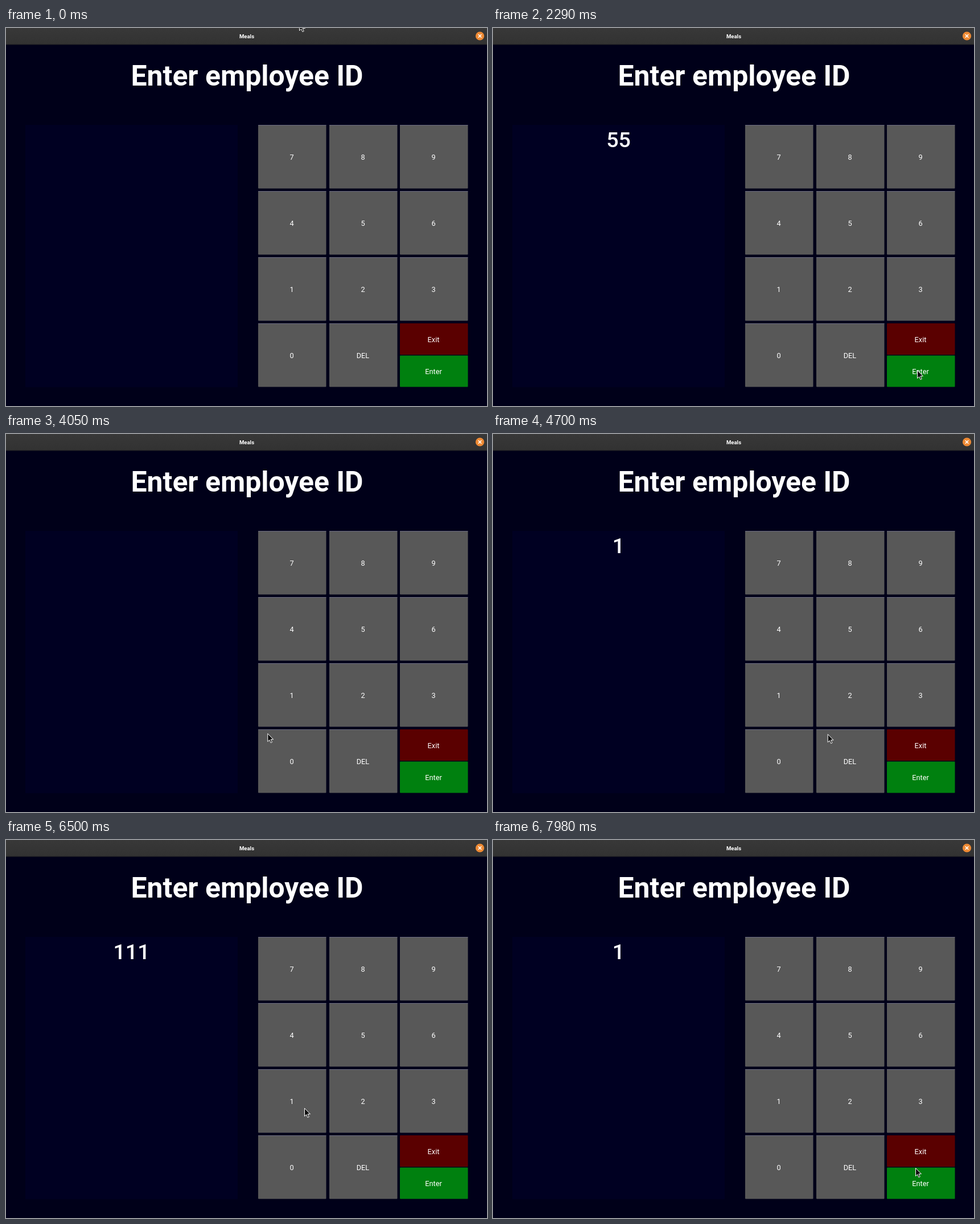
Write an HTML page that moves like this. It is 845 by 663 pixels and loops after 8000 ms.

```html
<!DOCTYPE html>
<html lang="en">
<head>
<meta charset="utf-8">
<title>Meals</title>
<style>
  html, body { margin: 0; width: 100%; height: 100%; overflow: hidden; background: #000019; }
  svg { display: block; width: 845px; height: 663px; }
  text { font-family: Roboto, sans-serif; fill: #fff; }
  .mid { text-anchor: middle; }
  .label { font-size: 12.75px; text-anchor: middle; }
</style>
</head>
<body>
<svg viewBox="0 0 845 663">
  <defs>
    <linearGradient id="bar" x2="0" y2="1">
      <stop offset="0" stop-color="#383838"/>
      <stop offset="1" stop-color="#323232"/>
    </linearGradient>
  </defs>
  <rect width="845" height="663" fill="#000019"/>
  <rect x="34" y="170" width="373" height="460" fill="#000022"/>
  <text class="mid" x="423.5" y="100.5" font-size="49.9" font-weight="700">Enter employee ID</text>
  <text id="entry" class="mid" x="220.5" y="209" font-size="37.6" font-weight="500"></text>
  <rect id="caret" x="219" y="174" width="1.2" height="44" fill="#d81028"/>
  <g id="keys"></g>

  <g id="popup">
    <rect y="29" width="845" height="634" fill="#000" fill-opacity=".7"/>
    <rect x="176" y="182" width="495" height="330" fill="#000010" fill-opacity=".78"/>
    <text x="191.5" y="209.5" font-size="11.9">Unknown Employee ID</text>
    <rect x="185" y="220" width="477" height="2" fill="#2fa7d4"/>
    <text class="mid" x="424" y="367.5" font-size="12.4">This ID is unknown, retry !</text>
  </g>

  <rect width="845" height="29" fill="url(#bar)"/>
  <rect y="28.5" width="845" height="1" fill="#1e1e22"/>
  <text class="mid" x="423" y="17.5" font-size="9.6" font-weight="700">Meals</text>
  <circle cx="832.5" cy="14" r="7.6" fill="#ee8a34"/>
  <path d="M829.7 11.2l5.6 5.6m0-5.6l-5.6 5.6" stroke="#fff" stroke-width="1.6"/>

  <path id="mouse" d="M.5 .5V14.5L3.7 11.6L5.9 16.6L8.2 15.6L6 10.7H10.4Z"
        fill="#0c0c0c" stroke="#fff" stroke-width="1" stroke-linejoin="round"/>
</svg>
<script>
const LOOP = 8000, HOLD = 85;
const GREY = "#585858", DOWN = "#32a4ce";
const $ = id => document.getElementById(id);

function add(tag, attrs, text = "") {
  const el = document.createElementNS("http://www.w3.org/2000/svg", tag);
  for (const k in attrs) el.setAttribute(k, attrs[k]);
  el.textContent = text;
  return $("keys").appendChild(el);
}

function makeKey(label, col, y, height, fill) {
  const x = Math.round(442.9 + col * 124.7), width = 119.5;
  const face = add("rect", { x, y, width, height, rx: 1, fill });
  if (fill === GREY) add("rect", { x, y, width, height: 1, fill: "#6c6c80" });
  add("text", { class: "label", x: x + 59, y: y + height / 2 + 5 }, label);
  return face;
}

const keys = {};
["789", "456", "123", ["0", "DEL"]].forEach((row, r) =>
  [...row].forEach((label, c) => {
    keys[label] = makeKey(label, c, 170 + r * 116, 111.5, GREY);
  }));
makeKey("Exit", 2, 518, 55, "#5a0000");
makeKey("Enter", 2, 574.5, 55, "#00800f");

// Pointer moves: start, end, and the point it comes to rest at
const moves = [
  [30, 260, 526, 156],
  [400, 720, 598, 289],
  [910, 1320, 621, 354],
  [1850, 2240, 745, 600],
  [2340, 2740, 728, 584],
  [3078, 3270, 379, 359],
  [3680, 3900, 428, 548],
  [3960, 4300, 504, 492],
  [4510, 5300, 727, 583],
  [5530, 5990, 643, 479.5],
  [5990, 6240, 524, 470],
  [6690, 7030, 189, 194],
  [7110, 7380, 524.5, 471],
  [7620, 7980, 742, 575]
];

// "Clear" wipes the field from the keyboard
const clicks = [
  [1510, "5"], [1710, "5"], [2255, "Enter"], [4430, "1"],
  [6280, "1"], [6410, "1"], [7000, "Clear"], [7520, "1"]
];

const ramp = (t, a, b) => Math.min(1, Math.max(0, (t - a) / (b - a)));
const easeOut = u => 1 - Math.pow(1 - u, 1.7);

function pointer(t) {
  let x = 515, y = -10;
  for (const [start, end, tx, ty] of moves) {
    const k = easeOut(ramp(t, start, end));
    x += (tx - x) * k;
    y += (ty - y) * k;
  }
  return `translate(${x.toFixed(2)} ${y.toFixed(2)})`;
}

function draw(t) {
  let text = "", last = "";
  const held = new Set();
  for (const [at, key] of clicks) {
    const digit = key.length === 1;
    if (t < (digit ? at : at + HOLD)) continue;
    text = digit ? text + key : "";
    last = key;
    if (t < at + HOLD) held.add(key);
  }
  for (const k in keys) keys[k].setAttribute("fill", held.has(k) ? DOWN : GREY);
  $("entry").textContent = text;
  $("caret").style.display = last === "Clear" ? "" : "none";
  $("popup").setAttribute("opacity", ramp(t, 2310, 2460) - ramp(t, 3890, 4030));
  $("mouse").setAttribute("transform", pointer(t));
}

function tick() {
  draw(performance.now() % LOOP);
  requestAnimationFrame(tick);
}
tick();
</script>
</body>
</html>
```
